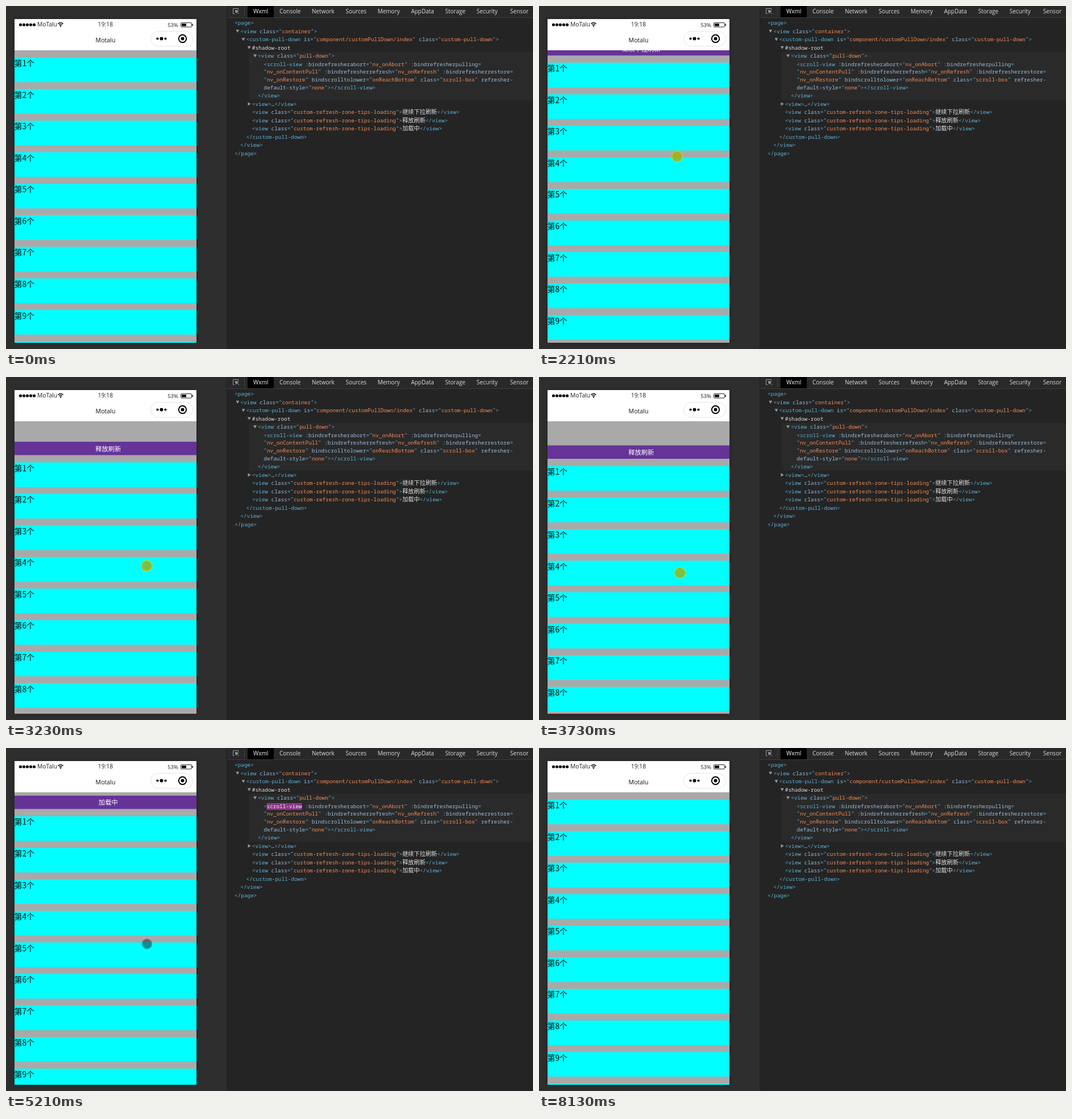
Write an HTML page with a canvas that moves like this. It is 927 px wide and 604 px high and loops after 8.86 s.

```html
<!DOCTYPE html>
<html lang="zh">
<head>
<meta charset="utf-8">
<title>Pull to refresh</title>
<style>
html, body { margin: 0; width: 100%; height: 100%; overflow: hidden; background: #2e2e2e; }
canvas { display: block; width: 927px; height: 604px; }
</style>
</head>
<body>
<canvas id="stage"></canvas>
<script>
const W = 927, H = 604, LOOP = 8860;
const STEP = LOOP / 72; // the picture advances about eight times a second
const PRESS = 1960, DRAG = 2100, RELEASE = 4182, RESTORE = 5050;
const HOLD = 40; // pull distance that triggers a refresh

const canvas = document.getElementById('stage');
const dpr = window.devicePixelRatio || 1;
canvas.width = W * dpr;
canvas.height = H * dpr;
const c = canvas.getContext('2d');
c.scale(dpr, dpr);

const UI = '"Open Sans", "Noto Sans", sans-serif';
const CJK = '"Noto Sans CJK SC", "Noto Sans CJK", sans-serif';
const MONO = '500 9.39px "Noto Sans Mono", "DejaVu Sans Mono", monospace';
const TAG = '#5db0d7', ATTR = '#9bbbdc', VALUE = '#f28b54', PLAIN = '#dedede';

const TABS = ['Wxml', 'Console', 'Network', 'Sources', 'Memory', 'AppData', 'Storage', 'Security'];

// Leading spaces give the depth of each line
const CODE = `<page>
 <view class="container">
  <custom-pull-down is="component/customPullDown/index" class="custom-pull-down">
   #shadow-root
    <view class="pull-down">
     <scroll-view :bindrefresherabort="nv_onAbort" :bindrefresherpulling=
     "nv_onContentPull" :bindrefresherrefresh="nv_onRefresh" :bindrefresherrestore=
     "nv_onRestore" bindscrolltolower="onReachBottom" class="scroll-box" refresher-
     default-style="none"></scroll-view>
    </view>
   <view>…</view>
   <view class="custom-refresh-zone-tips-loading">继续下拉刷新</view>
   <view class="custom-refresh-zone-tips-loading">释放刷新</view>
   <view class="custom-refresh-zone-tips-loading">加载中</view>
  </custom-pull-down>
 </view>
</page>`.split('\n');

// Pointer path: [time, x, y]
const PATH = [
  [123, 843, 600], [430, 459, 465], [690, 390, 427], [1060, 292, 336],
  [1600, 242, 252], [DRAG, 242, 252], [2706, 247, 320], [3700, 248, 345],
  [6150, 248, 345], [6273, 265, 348], [6396, 464, 367], [6765, 616, 456],
  [7257, 857, 538], [7490, 878, 580], [8118, 906, 604]
];

const clamp = p => Math.min(1, Math.max(0, p));
const easeOut = (p, n) => 1 - (1 - clamp(p)) ** n;
const smooth = p => clamp(p) ** 2 * (3 - 2 * clamp(p));
const mix = (a, b, p) => `rgb(${a.map((v, i) => Math.round(v + (b[i] - v) * p)).join(',')})`;

function pullAt(t) {
  if (t <= RELEASE) return 66 * easeOut((t - DRAG) / 1600, 2);
  if (t <= RESTORE) return HOLD + 26 * Math.exp((RELEASE - t) / 90);
  return HOLD * (1 - smooth((t - RESTORE) / 350));
}

function pointerAt(t) {
  const i = PATH.findIndex(k => k[0] > t);
  const [t0, x0, y0] = PATH[i - 1], [t1, x1, y1] = PATH[i];
  const p = (t - t0) / (t1 - t0);
  return [x0 + (x1 - x0) * p, y0 + (y1 - y0) * p];
}

function rect(x, y, w, h, color) {
  c.fillStyle = color;
  c.fillRect(x, y, w, h);
}

function disc(x, y, r, color) {
  c.fillStyle = color;
  c.beginPath();
  c.arc(x, y, r, 0, Math.PI * 2);
  c.fill();
}

function arc(x, y, r, width, color, from = 0, to = Math.PI * 2) {
  c.strokeStyle = color;
  c.lineWidth = width;
  c.beginPath();
  c.arc(x, y, r, from, to);
  c.stroke();
}

function roundBox(x, y, w, h, r, color) {
  c.strokeStyle = color;
  c.lineWidth = 1;
  c.beginPath();
  c.roundRect(x, y, w, h, r);
  c.stroke();
}

function triangle(x, y, r, turn, color) {
  c.fillStyle = color;
  c.beginPath();
  for (let i = 0; i < 3; i++) {
    const a = turn + i * Math.PI * 2 / 3;
    c.lineTo(x + r * Math.cos(a), y + r * Math.sin(a));
  }
  c.fill();
}

function text(str, x, y, font, color, align = 'left') {
  c.font = font;
  c.fillStyle = color;
  c.textAlign = align;
  c.fillText(str, x, y);
  return c.measureText(str).width;
}

function codeLine(x, y, line) {
  const parts = line.matchAll(/("[^"]*")|(<\/?[\w-]+|>|=)|([:\w-]+)|([^\s"<>=]+)|\s+/g);
  for (const [token, value, tag, attr, plain] of parts) {
    if (value) {
      x += text('"', x, y, MONO, TAG);
      x += text(value.slice(1, -1), x, y, MONO, VALUE);
      x += text('"', x, y, MONO, TAG);
    } else {
      const font = /[\u4e00-\u9fff]/.test(plain) ? '10.2px ' + CJK : MONO;
      x += text(token, x, y, font, tag ? TAG : attr ? ATTR : PLAIN);
    }
  }
}

// A changed node flashes purple, settles to grey, then clears
function drawFlash(t) {
  const k = (t - (t > RESTORE ? 5100 : 4400)) / 1400;
  if (k < 0 || k >= 1) return;
  const grey = [51, 51, 51];
  const p = easeOut(k / 0.8, 3);
  const back = k < 0.8
    ? mix([158, 54, 153], grey, p)
    : mix(grey, [42, 42, 42], easeOut((k - 0.8) / 0.2, 3));
  rect(458.6, 97, 62, 12, back);
  text('scroll-view', 458.6, 105.5, MONO, mix([255, 255, 255], [93, 176, 215], p));
}

function drawTabs() {
  rect(389, 0, 538, 20, '#292929');
  rect(389, 20, 538, 1, '#3c3c3c');
  rect(425, 0, 46, 20, '#000');
  rect(419, 3, 1, 14, '#444');

  c.strokeStyle = '#9a9a9a';
  c.lineWidth = 1;
  c.stroke(new Path2D('M402 13.5H399.5V4.5H408.5V7M406 10L410 14'));
  triangle(405.5, 9.5, 4, Math.PI * 1.25, '#9a9a9a');

  const font = '10px ' + UI;
  let x = 435;
  for (const name of TABS) x += text(name, x, 12.8, font, x === 435 ? '#fff' : '#dcdcdc') + 19.6;
  text('Sensor', 919, 12.8, font, '#dcdcdc', 'right');
}

function drawInspector(t) {
  rect(388, 0, 539, H, '#242424');
  rect(388, 0, 1, H, '#202020');
  drawTabs();
  rect(427, 81, 500, 84, '#2a2a2a');

  let y = 33;
  CODE.forEach((raw, i) => {
    const line = raw.trim();
    const x = 402 + (raw.length - line.length) * 10.25;
    const wrapped = !/^[<#]/.test(line);
    if (i) y += wrapped ? 13.8 : 14.5;
    if (i >= 1 && i <= 4) triangle(x - 5, y - 4, 3.5, Math.PI / 2, '#969696');
    if (line.includes('…')) triangle(x - 5.5, y - 3.5, 3.5, 0, '#969696');
    codeLine(x, y, line);
  });
  drawFlash(t);
}

function drawHeader() {
  const small = '10.3px ' + UI;
  rect(15, 23, 320, 55, '#fff');
  for (let i = 0; i < 5; i++) disc(25.5 + i * 6, 33, 2.6, '#000');
  text('MoTalu', 55, 36.3, small, '#222');
  for (const r of [3.6, 6.4]) arc(96, 36, r, 1.5, '#000', Math.PI * 1.25, Math.PI * 1.75);
  disc(96, 35.2, 1.2, '#000');

  text('19:18', 175, 36.3, small, '#222', 'center');
  text('53%', 303, 36.8, '9.6px ' + UI, '#222', 'right');
  roundBox(307.5, 29.5, 19, 7.5, 1.5, '#222');
  rect(309, 31, 8, 4.5, '#000');
  rect(327.5, 31.5, 1.5, 3.5, '#222');

  text('Motalu', 175, 64, '10.6px ' + UI, '#111', 'center');
  roundBox(254.5, 44.5, 74, 26.5, 13.25, '#e4e4e4');
  for (const i of [-1, 0, 1]) disc(273.5 + i * 7, 57.5, i ? 2.1 : 3, '#000');
  arc(310.5, 57.5, 6.7, 2, '#000');
  disc(310.5, 57.5, 3, '#000');
}

function drawList(t) {
  const pull = pullAt(t);
  c.save();
  c.beginPath();
  c.rect(15, 78, 320, 515);
  c.clip();
  rect(15, 78, 320, 515, '#a9a9a9');
  if (pull > 0) {
    const tip = t > RELEASE ? '加载中' : pull >= HOLD ? '释放刷新' : '继续下拉刷新';
    rect(15, 54.5 + pull, 320, 23.5, '#663399');
    text(tip, 179.8, 71 + pull, '11.3px ' + CJK, '#fff', 'center');
  }
  for (let i = 0; i < 10; i++) {
    const y = 90.8 + pull + i * 55.56;
    rect(15, y, 320, 43.3, '#0ff');
    text(`第${i + 1}个`, 14.5, y + 15.3, '300 13.9px ' + CJK, '#0a0a0a');
  }
  c.restore();
}

function drawPhone(t) {
  c.save();
  c.shadowColor = 'rgba(0,0,0,0.25)';
  c.shadowBlur = 9 * dpr;
  rect(15, 23, 320, 570, '#a9a9a9');
  c.restore();
  drawList(t);
  drawHeader();
}

function drawPointer(t) {
  if (t < PATH[0][0] || t >= PATH[PATH.length - 1][0]) return;
  const [x, y] = pointerAt(t);
  if (t >= PRESS - STEP / 2 && t < 4000) {
    disc(x, y, 9.5, 'rgba(169,172,0,0.74)');
    arc(x, y, 9.4, 1.4, 'rgba(205,215,30,0.75)');
    return;
  }
  const soft = c.createRadialGradient(x, y, 0, x, y, 10);
  soft.addColorStop(0.75, 'rgba(20,25,30,0.48)');
  soft.addColorStop(1, 'rgba(20,25,30,0)');
  disc(x, y, 10, soft);
}

function draw(time) {
  const t = Math.round(time % LOOP / STEP) * STEP;
  rect(0, 0, W, H, '#2e2e2e');
  drawPhone(t);
  drawInspector(t);
  drawPointer(t);
}

const began = performance.now();
function loop() {
  draw(performance.now() - began);
  requestAnimationFrame(loop);
}
loop();
</script>
</body>
</html>
```
